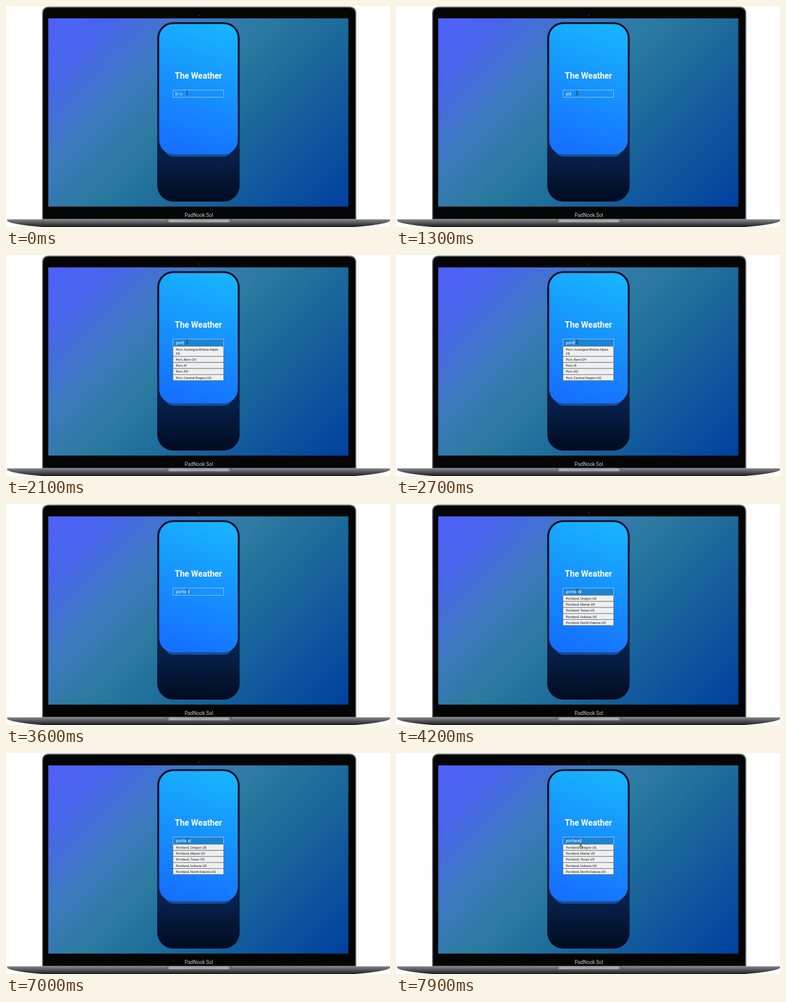
These frames come from a looping animation (650x374 px, 8000 ms). An HTML page:

```html
<!DOCTYPE html>
<html lang="en">
<head>
<meta charset="utf-8">
<title>The Weather</title>
<style>
  html, body { margin: 0; width: 100%; height: 100%; overflow: hidden; background: #fff; }
  svg { display: block; width: 650px; height: 374px; }
  text { font-family: Roboto, sans-serif; white-space: pre; }
  .row rect { fill: #efefef; stroke: #5a6068; stroke-width: .7; }
  .row text { font-size: 5.8px; fill: #222; }
</style>
</head>
<body>
<svg viewBox="0 0 650 374">
  <defs>
    <linearGradient id="sky" gradientUnits="userSpaceOnUse" x1="118.75" y1="-26.25" x2="532.25" y2="387.25">
      <stop stop-color="#5061fa"/>
      <stop offset=".13" stop-color="#4865ec"/>
      <stop offset=".3" stop-color="#3d7ac0"/>
      <stop offset=".45" stop-color="#2b7a9f"/>
      <stop offset=".6" stop-color="#1d6c9b"/>
      <stop offset="1" stop-color="#0040a0"/>
    </linearGradient>
    <linearGradient id="phone" x2="0" y2="1">
      <stop stop-color="#020d26"/>
      <stop offset=".74" stop-color="#07214b"/>
      <stop offset="1" stop-color="#010b20"/>
    </linearGradient>
    <linearGradient id="card" x1=".6" x2=".4" y2="1">
      <stop stop-color="#18b2fd"/>
      <stop offset="1" stop-color="#1570ff"/>
    </linearGradient>
    <linearGradient id="base" x2="0" y2="1">
      <stop stop-color="#8c8e92"/>
      <stop offset=".25" stop-color="#696b70"/>
      <stop offset=".6" stop-color="#46474b"/>
      <stop offset="1" stop-color="#18191b"/>
    </linearGradient>
    <linearGradient id="notch">
      <stop stop-color="#55575b"/>
      <stop offset=".06" stop-color="#a9abaf"/>
      <stop offset=".5" stop-color="#9b9da1"/>
      <stop offset=".94" stop-color="#a9abaf"/>
      <stop offset="1" stop-color="#55575b"/>
    </linearGradient>
  </defs>

  <path d="M62 361V13Q62 2 73 2H581Q592 2 592 13V361Z" fill="#050506" stroke="#606366" stroke-width="1.8"/>
  <circle cx="326.5" cy="15.5" r="1.4" fill="#22262c"/>
  <rect x="71.5" y="21" width="508" height="318.5" fill="url(#sky)"/>
  <text x="326.5" y="357" text-anchor="middle" font-size="8.4" fill="#c9cacc">PadNook Sol</text>
  <path d="M2 361H650V364Q640 370 590 374H62Q12 370 2 364Z" fill="url(#base)"/>
  <path d="M271 361H382V362Q381 366 376 366H277Q272 366 271 362Z" fill="url(#notch)"/>

  <rect x="256" y="27.5" width="139.5" height="303.5" rx="27" fill="url(#phone)"/>
  <path d="M268 240H384Q381 255 368 255H284Q271 255 268 240Z" fill="#154f96"/>
  <rect x="259.3" y="30.5" width="133" height="220.5" rx="24" fill="url(#card)"/>
  <text x="325.7" y="122.6" text-anchor="middle" font-size="14" font-weight="700" fill="#fff">The Weather</text>

  <rect id="field" x="282.7" y="142.2" width="85.8" height="12.3" stroke="#b5daf8" stroke-width=".7"/>
  <text id="entry" x="287.5" y="150.7" font-size="6.8"></text>
  <path id="caret" d="M0 145V151.8" stroke="#fff" stroke-width=".7"/>
  <g id="list"></g>
  <g id="mouse">
    <path id="beam" d="M-1.8-3.5Q0-3.5 0-2.5Q0-3.5 1.8-3.5M0-2.5V2.5M-1.8 3.5Q0 3.5 0 2.5Q0 3.5 1.8 3.5M-1 .8H1" fill="none" stroke="#33342c" stroke-width=".9"/>
    <path id="hand" d="M-1-3.3Q-.3-4 .3-3.3V-.9L2-.5Q2.6-.3 2.5 .6L1.9 3.2H-.9L-2.4 .9Q-2.1 0-1 .5Z" fill="#e0cf4c" stroke="#1d1d18" stroke-width=".8"/>
  </g>
</svg>
<script>
const LOOP = 8000, STEP = 100;
const $ = id => document.getElementById(id);

const places = {
  po: ["Pau, Nouvelle-Aquitaine FR", "Pau, Nouvelle-Aquitaine FR", "Tomari, Sakhalin Oblast RU", "Po, BF", "Po, Benue State NG"],
  port: ["Port, Auvergne-Rhône-Alpes\nFR", "Port, Bern CH", "Port, IE", "Port, RO", "Port, Central Region UG"],
  portland: ["Oregon", "Maine", "Texas", "Indiana", "North Dakota"].map(s => `Portland, ${s} US`)
};

// [start, typed text, query whose results are open]
const states = [
  [0, "", ""], [500, "p", ""], [1300, "po", ""], [1600, "po", "po"],
  [1900, "por", "po"], [2000, "port", "po"], [2100, "port", "port"],
  [2700, "portl", "port"], [2900, "portl", ""], [3100, "portla", ""],
  [3600, "portlan", ""], [4100, "portland", ""], [4200, "portland", "portland"]
];

// [time, x, y]
const path = [[0, 306.5, 147], [7000, 306.5, 147], [7600, 334, 175.5], [7700, 334, 175.5], [7900, 313, 158], [LOOP, 313, 158]];

function rows(query) {
  let y = 154.7;
  return (places[query] || []).map(place => {
    const lines = place.split("\n"), h = 3.4 + 6.8 * lines.length, top = y;
    y += h;
    const text = lines.map((s, i) => `<text x="287.5" y="${top + 7.2 + 6.8 * i}">${s}</text>`).join("");
    return `<g class="row"><rect x="282.7" y="${top}" width="85.8" height="${h}"/>${text}</g>`;
  }).join("");
}

function pointer(t) {
  const i = path.findIndex(p => p[0] > t), [t0, x0, y0] = path[i - 1], [t1, x1, y1] = path[i];
  const k = (t - t0) / (t1 - t0), e = k * k * (3 - 2 * k);
  return [x0 + (x1 - x0) * e, y0 + (y1 - y0) * e];
}

let shown;
function draw(now) {
  const t = Math.floor(now % LOOP / STEP) * STEP;
  const state = states.filter(s => s[0] <= t).pop();
  const [, typed, query] = state;
  if (state !== shown) {
    shown = state;
    $("entry").textContent = typed || "city...";
    $("entry").setAttribute("fill", typed ? "#fff" : "#a9d4f8");
    $("field").setAttribute("fill", query ? "#1a84d4" : "none");
    $("list").innerHTML = rows(query);
  }
  const end = 287.7 + (typed ? $("entry").getComputedTextLength() : 0);
  $("caret").setAttribute("transform", `translate(${end})`);
  $("caret").style.display = t < 5700 || t >= 7800 ? "" : "none";
  const [x, y] = pointer(t), overList = y > 154.7;
  $("mouse").setAttribute("transform", `translate(${x} ${y})`);
  $("beam").style.display = overList ? "none" : "";
  $("hand").style.display = overList ? "" : "none";
}

const start = performance.now();
function tick() {
  draw(performance.now() - start);
  requestAnimationFrame(tick);
}
tick();
</script>
</body>
</html>
```
